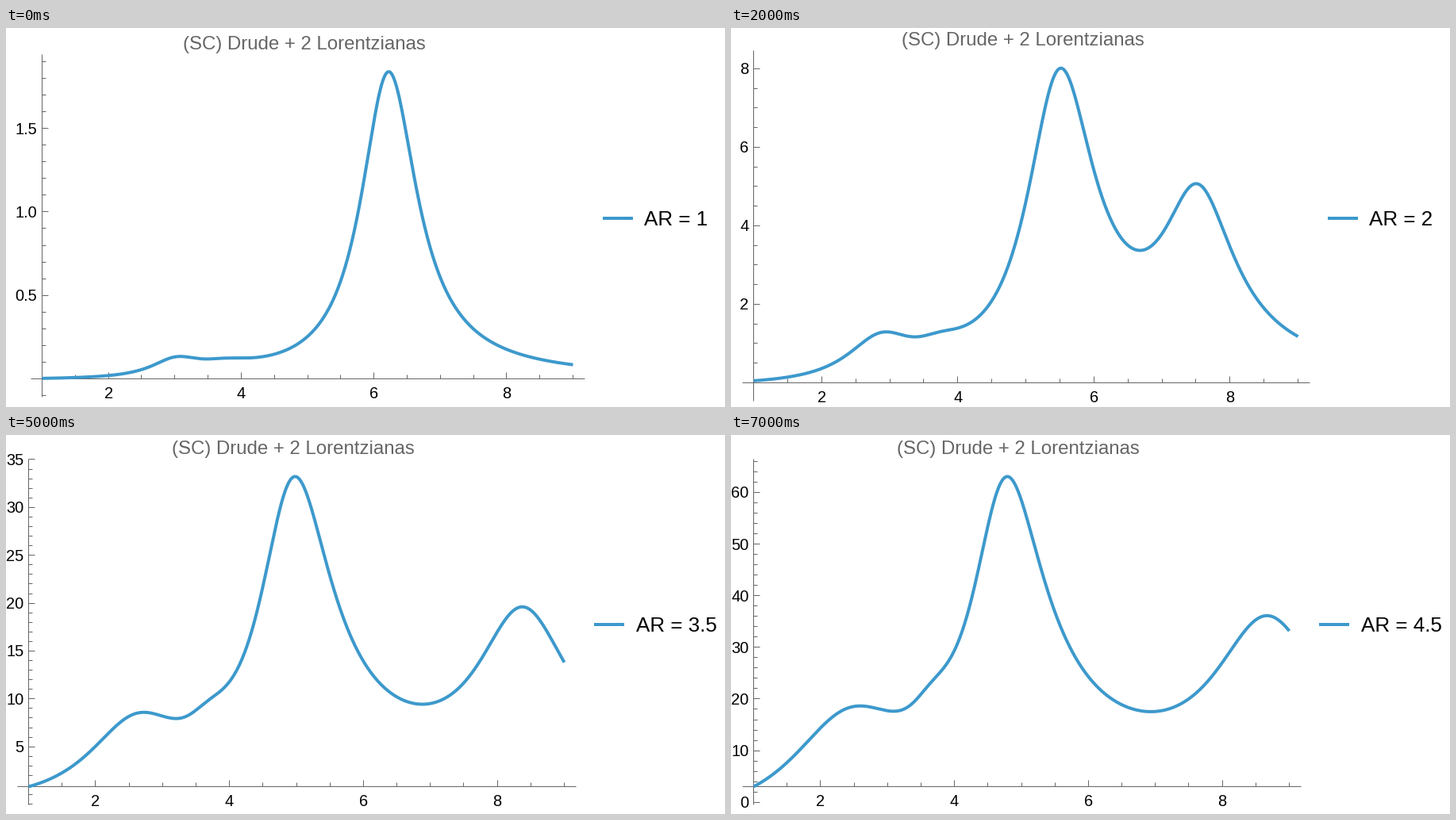
A matplotlib script that plays this animation: 906 by 478 pixels, repeating every 8 s.

```python
import math

import matplotlib.pyplot as plt
import numpy as np
from matplotlib.animation import FuncAnimation

W, H, DPI = 906, 478, 100
PT = 72 / DPI  # points per pixel
BLUE, GRAY = "#3d99cc", "#666666"
TITLE = "(SC) Drude + 2 Lorentzianas"
RATIOS = [1, 1.5, 2, 2.5, 3, 3.5, 4, 4.5]

plt.rcParams["font.family"] = "Liberation Sans"

# Turning points (x, y) of a few curves and single points (ratio, x, y):
# the optical constants are refined to pass through them.
TURNS = {
    1: [(3.075, 0.1385), (3.52, 0.121), (6.215, 1.86)],
    2: [(2.943, 1.272), (3.42, 1.153), (5.513, 7.893), (6.667, 3.42), (7.477, 4.966)],
    4.5: [(2.582, 18.76), (3.115, 17.71), (4.797, 63.47), (6.93, 17.26), (8.648, 36.58)],
}
POINTS = [(1, 4, 0.129), (1, 9, 0.084), (2, 4, 1.405), (2, 9, 1.18),
          (4.5, 1, 3.1), (4.5, 9, 33.2)]

# Start: three strengths, two resonances, two widths,
# Drude width at rest and per ratio, overall gain, growth exponent.
START = [78, 14, 10, 3.5, 4.2, 1.0, 1.0, 0.5, 0.46, 0.0068, 3.0]


def depolarization(ar):
    """Factor along the short axis of an oblate spheroid."""
    if ar == 1:
        return 1 / 3
    e = math.sqrt(1 - 1 / ar**2)
    return (1 - math.asin(e) / (ar * e)) / e**2


def spectrum(x, ar, p):
    """Absorption of a spheroid with a Drude and two Lorentz terms."""
    s0, s1, s2, w1, w2, g1, g2, g_rest, g_ar, gain, power = p
    chi = -s0 / (x**2 + 1j * (g_rest + g_ar * ar) * x)
    chi = chi + s1 / (w1**2 - x**2 - 1j * g1 * x)
    chi = chi + s2 / (w2**2 - x**2 - 1j * g2 * x)
    lz = depolarization(ar)
    lx = (1 - lz) / 2
    alpha = 2 * chi / (1 + lx * chi) + chi / (1 + lz * chi)
    return gain * ar**power * x * alpha.imag


def misfit(log_p):
    """Distances from the key points, in about pixels."""
    p = np.exp(log_p)
    out = []
    for ar, turns in TURNS.items():
        x, y = np.array(turns).T
        px = 390 / y.max()
        slope = (spectrum(x + 0.05, ar, p) - spectrum(x - 0.05, ar, p)) / 0.1
        out += [px * (spectrum(x, ar, p) - y), 0.03 * px * slope]
        single = [(a, b) for r, a, b in POINTS if r == ar]
        x, y = np.array(single, float).T
        out.append(px * (spectrum(x, ar, p) - y))
    return np.concatenate(out)


def refine(start, rounds=200):
    """Damped least squares on the logarithms of the constants."""
    q, damp = np.log(start), 0.01
    r = misfit(q)
    for _ in range(rounds):
        jac = np.array([(misfit(q + d) - r) / 1e-6 for d in 1e-6 * np.eye(len(q))]).T
        m = jac.T @ jac
        m += damp * np.diag(np.diag(m)) + 1e-9 * np.eye(len(q))
        trial = q + np.clip(np.linalg.solve(m, -jac.T @ r), -0.2, 0.2)
        r_new = misfit(trial)
        if r_new @ r_new < r @ r:
            q, r, damp = trial, r_new, max(damp / 3, 1e-7)
        else:
            damp = min(damp * 4, 1e6)
    return np.exp(q)


CONSTANTS = refine(START)
XS = np.linspace(1, 9, 900)

# Characters in a y label: axis top, baseline, legend height.
LAYOUTS = {1: (28, 447, 240), 2: (30, 443, 239), 3: (33, 442, 240)}

fig = plt.figure(figsize=(W / DPI, H / DPI), dpi=DPI, facecolor="white")
ax = fig.add_axes([0, 0, 1, 1])


def line(x, y, color=GRAY, width=1, **kw):
    ax.plot(x, y, color=color, lw=width * PT, solid_capstyle="butt", **kw)


def text(x, y, s, size, color="black", ha="center"):
    ax.text(x, y, s, fontsize=size * PT, color=color, ha=ha, va="baseline")


def draw_x_axis(to_x, base, left, right):
    line([left, right], [base, base])
    for k in range(3, 19):
        x = to_x(k / 2)
        major = k % 4 == 0
        line([math.floor(x)] * 2, [base, base - (8 if major else 5)])
        if major:
            text(x, base + 25, str(k // 2), 20)


def draw_y_axis(x0, base, top, zero, unit, step):
    bottom = base + 23
    line([x0, x0], [top, bottom])
    parts = 4 if step == 2 else 5
    minor = step / parts
    first = math.ceil((zero - bottom) / unit / minor)
    last = math.floor((zero - top) / unit / minor)
    for k in range(first, last + 1):
        y = zero - k * minor * unit
        major = k % parts == 0 and abs(y - base) > 16
        line([x0, x0 + (8 if major else 5)], [math.floor(y)] * 2)
        if major:
            v = k // parts * step
            text(x0 - 5.5, y + 7, f"{v:.1f}" if step < 1 else str(v), 20, ha="right")


def draw(i):
    ax.clear()
    ax.set_xlim(0, W)
    ax.set_ylim(H, 0)
    ax.axis("off")
    ar = RATIOS[i]
    ys = spectrum(XS, ar, CONSTANTS)
    peak = ys.max()
    low = ys.min() if ys.min() > 0.02 * peak else 0
    step = next(s for s in (0.5, 1, 2, 5, 10) if peak / s < 7.5)
    chars = 3 if step < 1 else len(str(int(peak / step) * step))
    top, base, key_y = LAYOUTS[chars]

    # The whole picture is centred, so a longer legend moves the plot left.
    edge = 0 if ar % 1 else 11
    right = edge + 718
    x0 = edge + 6 + (11, 22, 28)[chars - 1]
    left = x0 - 14
    unit = 0.947 * (base - top) / (peak - low)
    zero = base + 0.5 + low * unit

    def to_x(v):
        return x0 + 0.5 + (right - 15 - x0) * (v - 1) / 8

    draw_x_axis(to_x, base, left, right)
    draw_y_axis(x0, base, top, zero, unit, step)
    line(to_x(XS), zero - unit * ys, BLUE, 4, solid_joinstyle="round", zorder=3)
    text((left + right) / 2 - 4, top - 6.5, TITLE, 24, GRAY)
    line([right + 23, right + 61], [key_y, key_y], BLUE, 4)
    text(right + 75.5, key_y + 9, f"AR = {ar}", 26, ha="left")
    return []


anim = FuncAnimation(fig, draw, frames=len(RATIOS), init_func=lambda: [],
                     interval=1000, repeat=True, repeat_delay=0)
plt.show()
```
